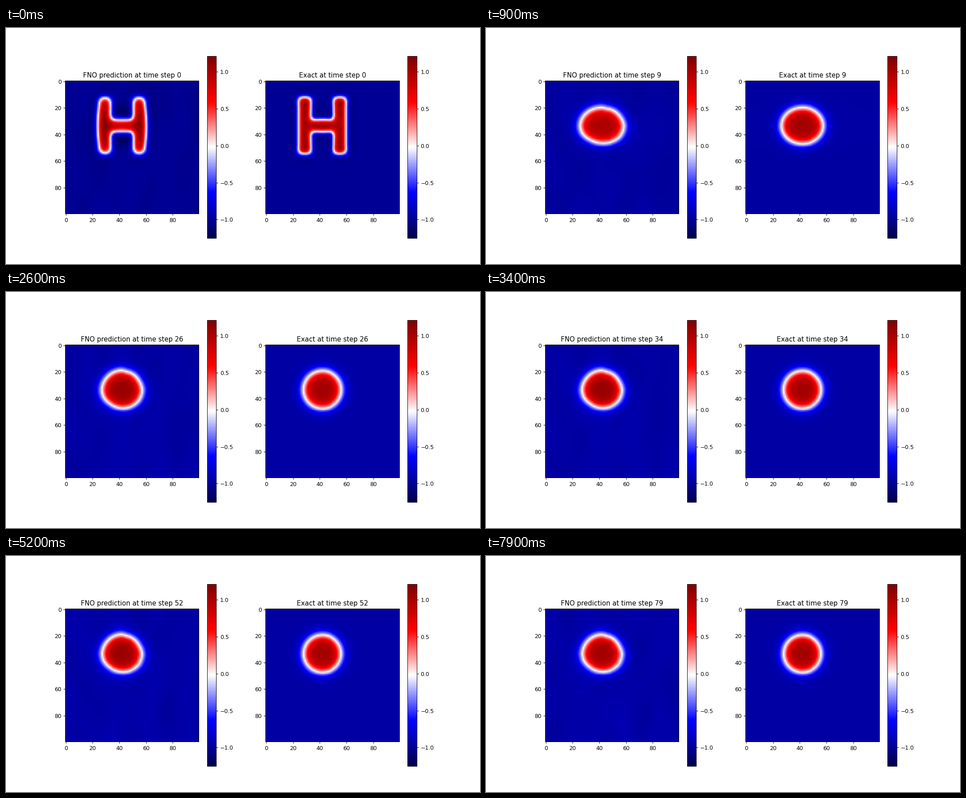
A matplotlib script that plays this animation: 1058x529 px, repeating every 8 s.

```python
import numpy as np
import matplotlib.pyplot as plt
from matplotlib.animation import FuncAnimation

N, STEPS = 100, 80
EPS = 3.0                 # interface thickness in cells
STEP_TIME = 55.0          # phase-field time per displayed step
CX, CY = 42.0, 33.5
VMIN, VMAX = -1.25, 1.21

yy, xx = np.mgrid[0:N, 0:N].astype(float)
dx, dy = xx - CX, yy - CY


def box(x, y, hx, hy):
    """Signed distance to a box; hx and hy are half sizes."""
    qx, qy = np.abs(x) - hx, np.abs(y) - hy
    outside = np.hypot(np.maximum(qx, 0), np.maximum(qy, 0))
    return outside + np.minimum(np.maximum(qx, qy), 0)


def letter(bow=0.0):
    """Letter H; bow curves the outer edges of the legs."""
    curve = bow * (0.2 - (dy / 21) ** 2) / 2
    left = box(dx + 13.2 + curve, dy, 4.5 + curve, 21)
    right = box(dx - 13.2 - curve, dy, 4.5 + curve, 21)
    bar = box(dx, dy, 13, 4.4)
    return -np.tanh(np.minimum(np.minimum(left, right), bar) / 1.5)


# Cahn-Hilliard flow, stabilised semi-implicit spectral scheme
k2 = ((2 * np.pi * np.fft.fftfreq(N))[:, None] ** 2
      + (2 * np.pi * np.fft.rfftfreq(N))[None, :] ** 2)


def evolve(u, time, count, s=2.0):
    dt = time / count
    denom = 1 + dt * (s * k2 + EPS ** 2 * k2 ** 2)
    uh = np.fft.rfft2(u)
    for _ in range(count):
        force = np.fft.rfft2(u ** 3 - (1 + s) * u)
        uh = (uh - dt * k2 * force) / denom
        u = np.fft.irfft2(uh, s=(N, N))
    return u


def exact_fields():
    u = evolve(letter(), 0.3, 6)
    fields = [u]
    for n in range(1, STEPS):
        u = evolve(u, STEP_TIME, 110 if n < 30 else 20)
        fields.append(u)
    return fields


exact = exact_fields()

# Outline of the predicted blob relative to the true one, by angle
ANGLES = [0, 32, 60, 78, 95, 130, 160, 180, 219, 245, 268, 285, 307, 335]
RATIOS = [1.06, 1.05, 1.0, .98, .965, .965, 1.04, 1.06, 1.03, 1.02, 1.01,
          .97, 1.0, 1.01]
theta = np.arctan2(dy, dx)
dist = np.hypot(dx, dy)
ratio = np.interp(np.degrees(theta) % 360, ANGLES, RATIOS, period=360)


def sample(u, x, y):
    x, y = np.clip(x, 0, N - 1.001), np.clip(y, 0, N - 1.001)
    i, j = x.astype(int), y.astype(int)
    fx, fy = x - i, y - j
    top = u[j, i] * (1 - fx) + u[j, i + 1] * fx
    low = u[j + 1, i] * (1 - fx) + u[j + 1, i + 1] * fx
    return top * (1 - fy) + low * fy


rng = np.random.default_rng(4)
modes = [(rng.uniform(-5, 5), rng.uniform(-2, 2),
          rng.uniform(0, 2 * np.pi), rng.normal(0, 0.05)) for _ in range(14)]


def ripple(n):
    """Faint smooth streaks that drift slowly."""
    total = sum(np.cos(2 * np.pi * (a * xx + b * yy) / N + p + w * n)
                for a, b, p, w in modes)
    return 0.005 * total


def first_guess():
    u = evolve(letter(1.4), 0.6, 6)
    inside = np.clip((u + 1) / 2, 0, 1)
    u = u + inside * (0.14 - 0.5 * (dy / 21) ** 2
                      - 0.36 * np.exp(-(dx / 7.5) ** 2))
    for side in (-11.5, 11.5):
        u -= 0.1 * np.exp(-(dx / 5) ** 2 - ((dy - side) / 4.5) ** 2)
    return u


start_error = first_guess() - exact[0]


def predicted(n):
    ramp = 1 - np.exp(-n / 3)
    r = dist / (1 + (ratio - 1) * ramp)
    u = sample(exact[n], CX + r * np.cos(theta), CY + r * np.sin(theta))
    core = np.interp(n, [0, 9, 26, 42, 64, 79], [0, -.04, .06, .06, .03, .01])
    u = u + core * np.clip((u + 1) / 2, 0, 1)
    return u + start_error * 0.4 ** n + ripple(n)


# 12 x 6 inches at this dpi gives 1058 x 529 pixels
fig, axes = plt.subplots(1, 2, figsize=(12, 6), dpi=88.16667)
images = []
for ax in axes:
    im = ax.imshow(exact[0], cmap="seismic", vmin=VMIN, vmax=VMAX,
                   interpolation="nearest")
    fig.colorbar(im, ax=ax)
    images.append(im)


def update(n):
    images[0].set_data(predicted(n))
    images[1].set_data(exact[n])
    axes[0].set_title(f"FNO prediction at time step {n}")
    axes[1].set_title(f"Exact at time step {n}")
    return images


anim = FuncAnimation(fig, update, frames=STEPS, interval=100,
                     repeat=True, repeat_delay=0, blit=False)
plt.show()
```
